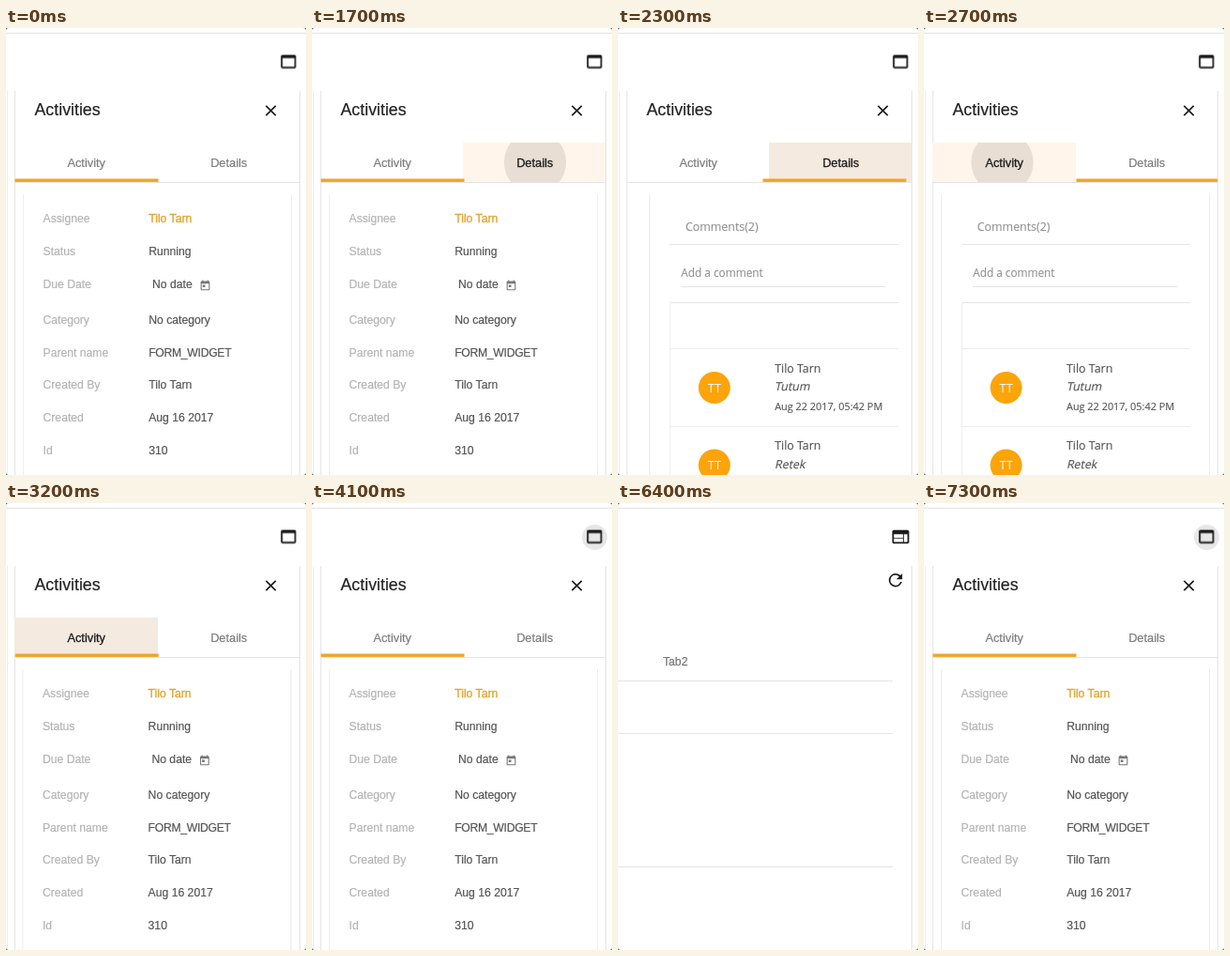
Recreate the animation shown at these times as an HTML page. Size 320x476 px, loop 7400 ms.

```html
<!DOCTYPE html>
<html lang="en">
<head>
<meta charset="utf-8">
<title>Activities panel</title>
<style>
html, body { margin: 0; height: 100%; overflow: hidden; background: #fff; }
svg { display: block; width: 100%; height: 100%; }
text { font: 12.2px "Liberation Sans", Arial, sans-serif; fill: #555; stroke: #555; stroke-width: .2px; }
.label { fill: #b3b3b3; stroke: #b3b3b3; }
.accent { fill: #e0a636; stroke: #e0a636; stroke-width: .4px; }
.code { letter-spacing: -.3px; }
.title { font-size: 17.8px; fill: #222; stroke: #222; }
.tab { font-size: 12.8px; fill: #7c7c7c; stroke: #7c7c7c; text-anchor: middle; }
.tab.focus { fill: #1c1c1c; stroke: #1c1c1c; stroke-width: .3px; }
.comment text { font: 12.4px "Open Sans", sans-serif; stroke-width: .15px; }
.comment .hint { fill: #919191; stroke: #919191; }
.comment .small { font-size: 10.9px; }
.comment .slanted { transform-box: fill-box; transform-origin: 0 75%; transform: skewX(-12deg); }
.comment .initials { font-size: 12.5px; fill: #fff; stroke: none; text-anchor: middle; }
.line { fill: none; stroke: #e4e4e4; }
.faint { fill: none; stroke: #eee; }
.icon { fill: #1c1c1c; }
.ripple { fill: #000; fill-opacity: .09; }
</style>
</head>
<body>
<svg viewBox="0 0 320 476">
  <defs>
    <clipPath id="body"><path d="M9 122H313V476H9z"/></clipPath>
    <clipPath id="left"><path d="M9 122.5H161.5V164H9z"/></clipPath>
    <clipPath id="right"><path d="M161.5 122.5H313V164H161.5z"/></clipPath>
  </defs>
  <rect width="320" height="476" fill="#fff"/>
  <path class="line" d="M0 5.5H320M313.5 67V476"/>
  <circle id="halo" cx="301.5" cy="36.5" r="13.5" fill="#e7e7e7"/>

  <g id="panel">
    <path class="icon" transform="translate(290.5 25) scale(.9)" fill-rule="evenodd"
      d="M19 4H5c-1.1 0-2 .9-2 2v12c0 1.1.9 2 2 2h14c1.1 0 2-.9 2-2V6c0-1.1-.9-2-2-2zm0 14H5V8h14z"/>
    <path class="line" d="M9.5 67V476"/>
    <path class="faint" d="M1.5 67V476"/>
    <text class="title" x="30.5" y="92.5">Activities</text>
    <path d="M277.3 82.8L287.7 93.2M287.7 82.8L277.3 93.2" stroke="#1c1c1c" stroke-width="1.7"/>

    <g id="tintLeft" clip-path="url(#left)">
      <path d="M9 122H162V164H9z" fill="#fff5ea"/>
      <circle class="ripple" id="rippleLeft" cx="83.5" cy="143" r="0"/>
    </g>
    <g id="tintRight" clip-path="url(#right)">
      <path d="M161 122H313V164H161z" fill="#fff5ea"/>
      <circle class="ripple" id="rippleRight" cx="238" cy="143" r="0"/>
    </g>
    <g id="idleLeft"><text class="tab" x="85.7" y="147.5">Activity</text></g>
    <g id="focusLeft"><text class="tab focus" x="85.7" y="147.5">Activity</text></g>
    <g id="idleRight"><text class="tab" x="237.7" y="147.5">Details</text></g>
    <g id="focusRight"><text class="tab focus" x="237.7" y="147.5">Details</text></g>
    <path class="line" d="M10 164.5H313"/>

    <g clip-path="url(#body)">
      <rect id="ink" x="9.5" y="160.5" width="153" height="3.4" fill="#eda626"/>
      <g id="pages">
        <path class="faint" d="M18.5 177V476M304.5 177V476"/>
        <g id="fields"></g>
        <path transform="translate(206 268) scale(.54)" fill="#777" fill-rule="evenodd"
          d="M7 10h5v5H7zM16 1v2H8V1H6v2H5c-1.1 0-2 .9-2 2v14c0 1.1.9 2 2 2h14c1.1 0 2-.9 2-2V5c0-1.1-.9-2-2-2h-1V1zm3 18H5V8h14z"/>
        <g class="comment" transform="translate(286)">
          <path class="faint" d="M18.5 177V476M304.5 177V476"/>
          <path class="line" d="M40 230.5H284M52 275.5H270.5M40 292.5H284"/>
          <path class="faint" d="M40.5 292V476M40 341.5H284M40 424.5H284"/>
          <text class="hint" x="56.8" y="216">Comments(2)</text>
          <text class="hint" x="52.2" y="265" style="font-size:11.8px">Add a comment</text>
          <g id="comments"></g>
        </g>
      </g>
    </g>
  </g>

  <g id="form">
    <path class="icon" transform="translate(290.7 25.2) scale(.9)" fill-rule="evenodd"
      d="M20 4H4c-1.1 0-2 .9-2 2v12c0 1.1.9 2 2 2h16c1.1 0 2-.9 2-2V6c0-1.1-.9-2-2-2zM15 18H4v-4h11zm0-5H4V9h11zm5 5h-4V9h4z"/>
    <path class="icon" transform="translate(285.2 71.4) scale(.9)"
      d="M17.65 6.35A8 8 0 0 0 12 4a8 8 0 1 0 7.73 10h-2.08A6 6 0 1 1 12 6c1.66 0 3.14.69 4.22 1.78L13 11h7V4z"/>
    <text x="48" y="172.5" style="fill:#777;stroke:#777;stroke-width:.25px">Tab2</text>
    <path class="line" d="M0 189.5H293M0 245.5H293M0 387.5H293"/>
  </g>

  <path fill="#666" d="M0 0H3Q0 0 0 3zM320 0H317Q320 0 320 3zM0 476H3Q0 476 0 473zM320 476H317Q320 476 320 473z"/>
</svg>
<script>
const LOOP = 7400, STEP = 100;
const EASE = 'cubic-bezier(.35, 0, .25, 1)';
const $ = id => document.getElementById(id);
const PERSON = 'Tilo Tarn';

const text = (x, y, content, type = '') => `<text class="${type}" x="${x}" y="${y}">${content}</text>`;

$('fields').innerHTML = [
  [207, 'Assignee', PERSON, 'accent'],
  [242, 'Status', 'Running'],
  [277, 'Due Date', 'No date'],
  [315, 'Category', 'No category'],
  [349.5, 'Parent name', 'FORM_WIDGET', 'code'],
  [384, 'Created By', PERSON],
  [419, 'Created', 'Aug 16 2017'],
  [454, 'Id', '310']
].map(([y, label, value, type]) =>
  text(39.5, y, label, 'label') + text(label === 'Due Date' ? 156 : 152.2, y, value, type)
).join('');

$('comments').innerHTML = [[383, 'Tutum'], [465.5, 'Retek']].map(([y, body]) =>
  `<circle cx="87.6" cy="${y}" r="17" fill="#fca40a"/>` +
  text(87.6, y + 4.5, 'TT', 'initials') +
  text(152, y - 16.5, PERSON) +
  text(152, y + 3.5, body, 'slanted') +
  text(152, y + 24, 'Aug 22 2017, 05:42 PM', 'small')
).join('');

const animations = [];

// Stops are [ms, value, easing towards the next stop].
function track(id, prop, stops) {
  const last = stops[stops.length - 1];
  const frames = [...stops, [LOOP, last[1]]].map(([ms, value, easing = 'linear']) =>
    ({ offset: ms / LOOP, [prop]: value, easing }));
  const animation = $(id).animate(frames, { duration: LOOP, iterations: Infinity });
  animation.pause();
  animations.push(animation);
}

// Hard on/off switching; each time flips the state.
function toggle(id, on, ...times) {
  track(id, 'opacity', [0, ...times].map((ms, i) => [ms, Number(i % 2 ? !on : on), 'step-end']));
}

function slide(id, distance) {
  const rest = 'translateX(0px)', moved = `translateX(${distance}px)`;
  track(id, 'transform', [[0, rest], [1935, rest, EASE], [2435, moved], [2730, moved, EASE], [3230, rest]]);
}

function ripple(id, start, fade, end) {
  track(id, 'r', [[0, '0px'], [start - 50, '0px'], [start, '33px'], [start + 300, '90px']]);
  track(id, 'opacity', [[0, 1], [fade, 1], [end, 0]]);
}

slide('pages', -286);
slide('ink', 153);
ripple('rippleRight', 1700, 2100, 2500);
ripple('rippleLeft', 2700, 3100, 3300);

for (const [side, from, to] of [['Right', 1700, 2700], ['Left', 2700, 3900]]) {
  toggle('tint' + side, false, from, to);
  toggle('focus' + side, false, from, to);
  toggle('idle' + side, true, from, to);
}

const switches = [4200, 5200, 5900, 7200];
toggle('panel', true, ...switches);
toggle('form', false, ...switches);
track('halo', 'opacity', [
  [0, 0], [3850, 0], [4000, 1], [4200, 1], [4500, 0],
  [4850, 0], [5000, 1], [6100, 1], [6400, 0], [6850, 0], [7000, 1]
]);

// The picture advances ten times a second.
function draw() {
  const time = Math.floor(performance.now() % LOOP / STEP) * STEP + 1;
  for (const animation of animations) animation.currentTime = time;
  requestAnimationFrame(draw);
}
draw();
</script>
</body>
</html>
```
